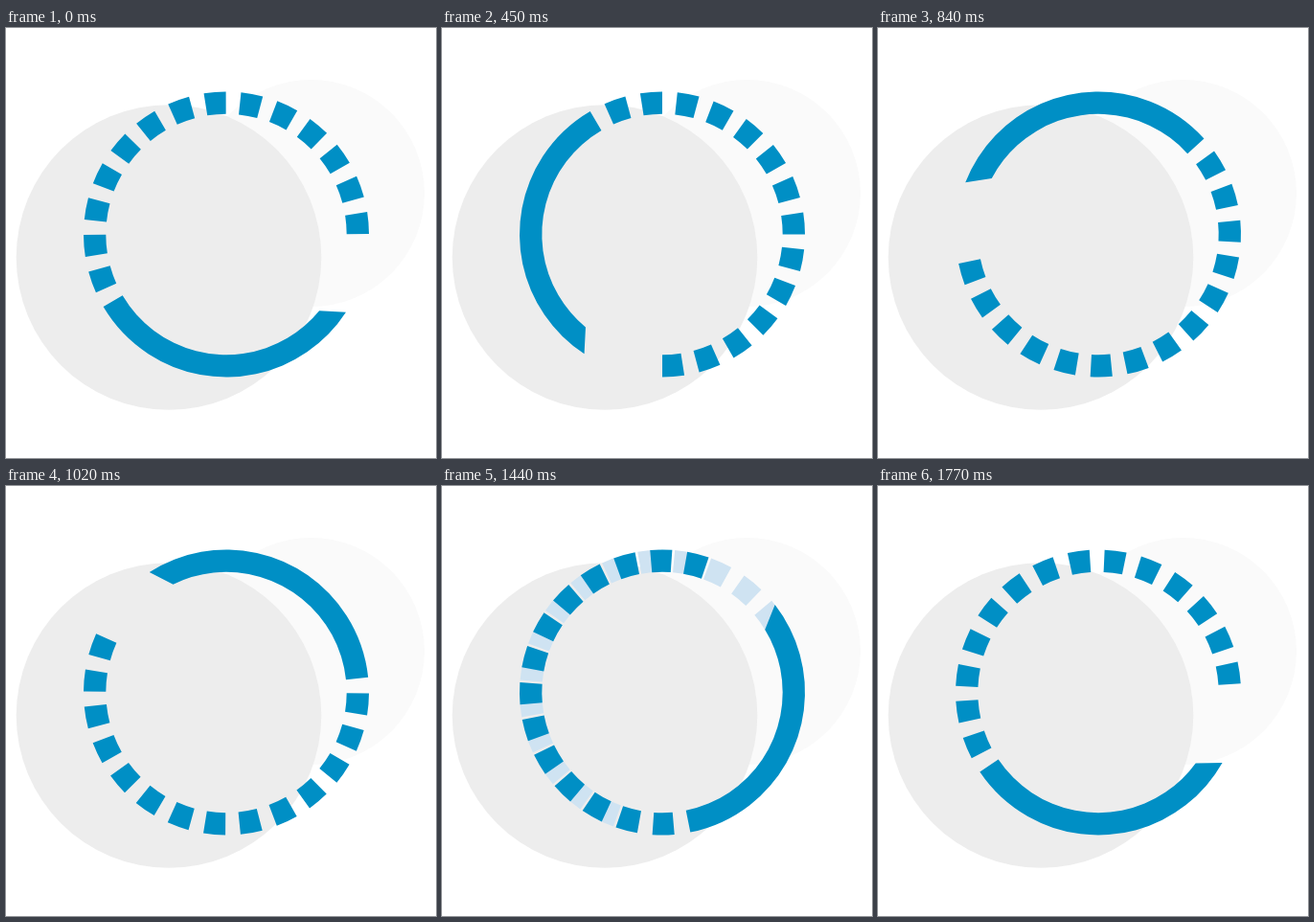
Recreate the animation shown at these times as an HTML page with a canvas. Size 449 by 449 pixels, loop 1800 ms.

```html
<!DOCTYPE html>
<html>
<head>
<meta charset="utf-8">
<style>
html, body { margin: 0; width: 100%; height: 100%; overflow: hidden; background: #fff; }
canvas { display: block; }
</style>
</head>
<body>
<canvas id="stage" width="449" height="449"></canvas>
<script>
const ctx = document.getElementById('stage').getContext('2d');
const LOOP = 1800, STEP = 30;
const CX = 230, CY = 215.5, OUTER = 149, INNER = 125.7;
const BLUE = '#008fc5';
const HALF = 4.45, PITCH = 15;

// [time in ms, turn in degrees]
const turns = [[0, 0], [300, 60], [630, 126.3], [1020, 204.4],
               [1290, 258.3], [1590, 320], [1770, 356.6], [1800, 360]];

// Pale marks that stay still while the ring turns over them
const trails = [
  { from: 210, to: 390, first: 210.7, count: 12, color: '#cae0f0' },
  { from: 1200, to: 1440, first: 174.3, count: 9, color: '#e4eff8' },
  { from: 1440, to: 1680, first: 114.5, count: 17, color: '#cfe3f2' }
];

const rad = deg => deg * Math.PI / 180;

function turnAt(t) {
  let i = 1;
  while (t > turns[i][0]) i++;
  const [t0, a0] = turns[i - 1], [t1, a1] = turns[i];
  return a0 + (a1 - a0) * (t - t0) / (t1 - t0);
}

function disc(x, y, r, color) {
  ctx.fillStyle = color;
  ctx.beginPath();
  ctx.arc(x, y, r, 0, Math.PI * 2);
  ctx.fill();
}

function band(start, end, color, innerStart = start) {
  ctx.fillStyle = color;
  ctx.beginPath();
  ctx.arc(CX, CY, OUTER, rad(start), rad(end));
  ctx.arc(CX, CY, INNER, rad(end), rad(innerStart), true);
  ctx.closePath();
  ctx.fill();
}

function dashes(first, count, color) {
  for (let i = 0; i < count; i++) {
    const a = first + i * PITCH;
    band(a - HALF, a + HALF, color);
  }
}

function draw(t) {
  ctx.fillStyle = '#fff';
  ctx.fillRect(0, 0, 449, 449);
  disc(318.5, 172.5, 118.5, '#fafafa');
  disc(170, 239.5, 159.3, '#ededed');

  const turn = turnAt(t);
  for (const s of trails) {
    if (t >= s.from && t < s.to) dashes(s.first, s.count, s.color);
  }
  if (t >= 210 && t < 390) band(turn + 2, turn + 41, '#e6eff4');

  dashes(turn + 160.4, 14, BLUE);
  band(turn + 33, turn + 149.5, BLUE, turn + 39.4);
}

const begin = performance.now();
function tick() {
  const t = (performance.now() - begin) % LOOP;
  draw(Math.floor(t / STEP) * STEP);
  requestAnimationFrame(tick);
}
tick();
</script>
</body>
</html>
```
